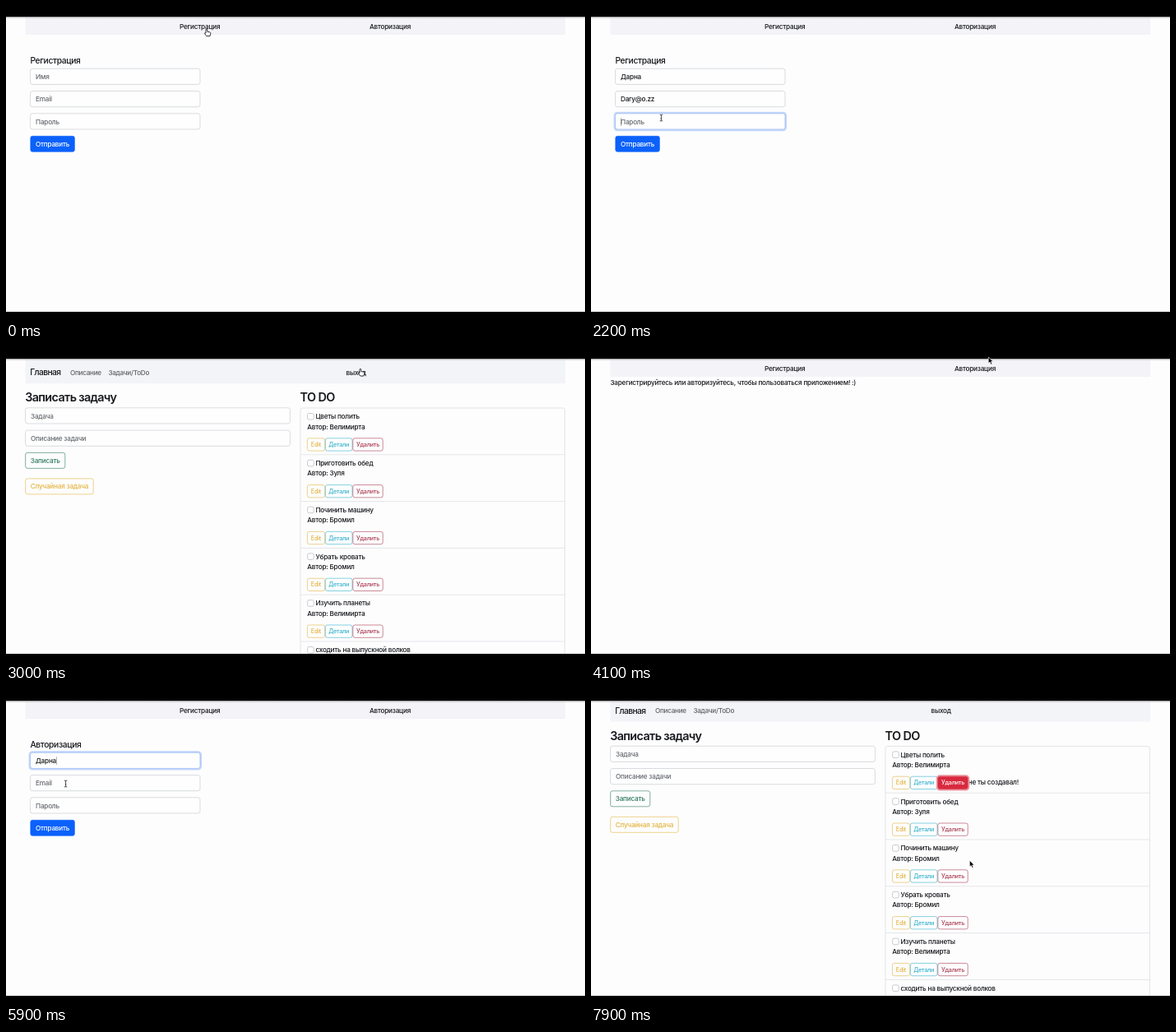
Recreate the animation shown at these times as an HTML page. Size 704x382 px, loop 8000 ms.

```html
<!DOCTYPE html>
<html lang="ru">
<head>
<meta charset="utf-8">
<title>Задачи</title>
<style>
  html, body { margin: 0; width: 100%; height: 100%; overflow: hidden; background: #fdfdfe; }
  svg { display: block; width: 704px; height: 382px; }
  text { font: 450 8.2px Inter, Roboto, sans-serif; letter-spacing: -.027em; fill: #16181b; white-space: pre; }
  .mid { text-anchor: middle; }
  .soft { fill: #65696f; }
  .link { fill: #5f6266; letter-spacing: -.035em; }
  .h5 { font-size: 10.3px; font-weight: 550; letter-spacing: -.035em; }
  .h3 { font-size: 14.4px; font-weight: 580; letter-spacing: -.045em; }
  .brand { font-size: 10.3px; font-weight: 500; letter-spacing: -.06em; }
  .small { font-size: 7.2px; }
  .caret { font-weight: 200; }
</style>
</head>
<body>
<svg viewBox="0 0 704 382">
  <defs>
    <linearGradient id="shade" x2="0" y2="1">
      <stop stop-color="#999"/>
      <stop offset="1" stop-color="#ccc" stop-opacity="0"/>
    </linearGradient>
  </defs>
  <rect width="704" height="382" fill="#fdfdfe"/>
  <g id="page"></g>
  <rect y="13" width="704" height="2.6" fill="url(#shade)"/>
  <rect width="704" height="13"/>
  <rect y="372" width="704" height="10"/>
  <g id="cursor"></g>
</svg>
<script>
const LOOP = 8000, STEP = 100;
const USER = 'Дарна', MAIL = 'Dary@o.zz', PASS = '•••••';
const RED = '#a83a50', YELLOW = '#e3b440', CYAN = '#35b2cc', GREEN = '#2f7a5e';

const page = document.getElementById('page');
const cursor = document.getElementById('cursor');

const text = (x, y, str, cls = '', attrs = '') => `<text x="${x}" y="${y}" class="${cls}" ${attrs}>${str}</text>`;

const box = (x, y, w, h, fill, stroke = 'none', r = 2.6, width = .7) =>
  `<rect x="${x}" y="${y}" width="${w}" height="${h}" rx="${r}" fill="${fill}" stroke="${stroke}" stroke-width="${width}"/>`;

function button(x, y, w, h, label, color, solid, cls = '') {
  return box(x, y, w, h, solid ? color : '#fdfdfe', color, 2.4, .6) +
    text(x + w / 2, y + h / 2 + (cls ? 2.6 : 3), label, 'mid ' + cls, `style="fill:${solid ? '#fff' : color}"`);
}

function field(x, y, w, hint, value = '', focused = false) {
  const ring = focused ? box(x - 1, y - 1, w + 2, 21.4, 'none', '#c3d6fb', 3.4, 2) : '';
  const caret = focused ? '<tspan class="caret" dx="-.8">|</tspan>' : '';
  const base = y + 12.8;
  const content = value
    ? text(x + 6.4, base, value + caret)
    : text(x + 6.4, base, hint, 'soft') + (focused ? text(x + 5.6, base, '|', 'caret') : '');
  return ring + box(x, y, w, 19.2, '#fefefe', focused ? '#8db0f3' : '#c9cdd2') + content;
}

const guestNav = () => box(23.5, 13, 656.5, 22, '#f3f3f8', 'none', 0) +
  text(235.7, 28.4, 'Регистрация', 'mid') + text(467, 28.4, 'Авторизация', 'mid');

const gate = () => guestNav() +
  text(23.4, 44.6, 'Зарегистрируйтесь или авторизуйтесь, чтобы пользоваться приложением! :)');

function form(title, values, focus) {
  const fields = ['Имя', 'Email', 'Пароль'].map((hint, i) =>
    field(29.6, 76.2 + 27.3 * i, 206.4, hint, values[i], focus === i)).join('');
  return guestNav() + text(29.4, 69.6, title, 'h5') + fields +
    button(29.8, 158.3, 53.6, 19, 'Отправить', '#0b61fb', true);
}

const TASKS = [
  ['Цветы полить', 'Велимирта'],
  ['Приготовить обед', 'Зуля'],
  ['Починить машину', 'Бромил'],
  ['Убрать кровать', 'Бромил'],
  ['Изучить планеты', 'Велимирта'],
  ['сходить на выпускной волков', 'Бромил']
];

function task([name, author], i, active, ring, message) {
  const y = 68.4 + 56.8 * i;
  return (i ? `<path d="M358 ${y}H679.5" stroke="#dcdde0" stroke-width=".7"/>` : '') +
    box(366.6, y + 6.5, 7.6, 7.6, '#fefefe', '#b4b7bb', 1.8) +
    text(376.4, y + 13.3, name) +
    text(366.2, y + 25.6, 'Автор: ' + author) +
    (message ? text(458.8, y + 47, 'не ты создавал!') : '') +
    button(366.4, y + 36.8, 21.2, 15.3, 'Edit', YELLOW, false, 'small') +
    button(388.4, y + 36.8, 32.6, 15.3, 'Детали', CYAN, false, 'small') +
    (ring ? box(420.8, y + 35.8, 38.4, 17.3, 'none', '#eb9aa4', 3.2, 2) : '') +
    button(421.8, y + 36.8, 36.4, 15.3, 'Удалить', active ? '#d9293e' : RED, active, 'small');
}

function board(shift, t) {
  const rows = TASKS.map((item, i) =>
    task(item, i, !i && t >= 6800, !i && t >= 6900, !i && t >= 7000)).join('');
  return box(23.5, 13, 656.5, 25.5 + shift, '#f3f4f8', 'none', 0) +
    `<g transform="translate(0 ${shift})">` +
    text(29.2, 28.7, 'Главная', 'brand') +
    text(78, 28, 'Описание', 'link') + text(124.4, 28, 'Задачи/ToDo', 'link') +
    text(425.6, 28, 'выход', 'mid') +
    text(23.2, 60.8, 'Записать задачу', 'h3') + text(357.6, 60.8, 'TO DO', 'h3') +
    field(23.6, 68.2, 321.8, 'Задача') + field(23.6, 95.5, 321.8, 'Описание задачи') +
    button(23.7, 122.8, 48.1, 19, 'Записать', GREEN) +
    button(23.7, 154.3, 82.5, 19, 'Случайная задача', YELLOW) +
    box(358, 68.4, 321.5, 340, '#fdfdfe', '#d6d8db') + rows + '</g>';
}

// Part of a string typed between two moments
const typed = (str, t, from, to) =>
  str.slice(0, Math.max(0, Math.ceil(str.length * Math.min(1, (t - from) / (to - from)))));

function register(t) {
  const focus = t < 500 ? -1 : t < 900 ? 0 : t < 2000 ? 1 : t < 2700 ? 2 : -1;
  return form('Регистрация',
    [typed(USER, t, 500, 800), typed(MAIL, t, 900, 1500), typed(PASS, t, 2200, 2500)], focus);
}

function login(t) {
  const focus = t < 5400 ? -1 : t < 6000 ? 0 : t < 6100 ? 1 : 2;
  return form('Авторизация',
    [typed(USER, t, 5400, 5800), typed(MAIL, t, 5900, 6000), typed(PASS, t, 6000, 6100)], focus);
}

function scene(t) {
  if (t < 2700) return register(t);
  if (t < 3300) return board(4.6, t);
  if (t < 4700) return gate();
  if (t < 6300) return login(t);
  return board(t < 6400 ? 4.6 : 0, t);
}

const SHAPES = {
  none: '',
  arrow: '<path d="M0 0V7.6L1.8 6 3.1 8.9 4.5 8.3 3.2 5.5H5.6Z" fill="#000" stroke="#fff" stroke-width=".6"/>',
  hand: '<path d="M-1 .8a.9.9 0 0 1 1.8 0V3.2l3 .6q1.3.4 1 1.7L4 8.6H-.3L-2.6 5.3q.1-1.1 1.6-.2Z" fill="#fff" stroke="#222" stroke-width=".9" stroke-linejoin="round"/>',
  beam: '<path d="M-1.7-4Q0-4 0-3Q0-4 1.7-4M0-3V3M-1.7 4Q0 4 0 3Q0 4 1.7 4M-.8.9H.8" fill="none" stroke="#222" stroke-width=".8"/>'
};

// Pointer stops: time, x, y, shape until the next stop
const STOPS = [
  [0, 244, 28, 'hand'], [100, 220, 40, 'arrow'], [400, 90, 86, 'beam'],
  [600, 90, 86, 'none'], [900, 82, 113, 'beam'], [1000, 82, 113, 'none'],
  [1700, 82, 113, 'beam'], [2000, 85.4, 136, 'beam'], [2300, 85.4, 136, 'none'],
  [2500, 70, 158, 'arrow'], [2600, 60, 165, 'hand'], [2700, 62, 165, 'arrow'],
  [3000, 431, 25.4, 'hand'], [3300, 431, 25.4, 'arrow'], [3400, 431, 25.4, 'arrow'],
  [3800, 470, 36, 'arrow'], [4100, 483.2, 11, 'arrow'], [4300, 467, 27, 'arrow'],
  [4400, 467, 27, 'hand'], [4900, 467, 27, 'arrow'], [5400, 80, 87, 'beam'],
  [5500, 80, 87, 'none'], [5900, 72.6, 114, 'beam'], [6000, 80, 138, 'beam'],
  [6200, 60, 165, 'hand'], [6300, 240, 120, 'arrow'], [6400, 420.4, 73, 'arrow'],
  [6700, 438, 98, 'arrow'], [6800, 438, 111, 'hand'], [7100, 438, 111, 'hand'],
  [7200, 447, 124, 'arrow'], [7600, 457, 328, 'arrow'], [7900, 460.4, 207.4, 'arrow']
];

function pointer(t) {
  const i = STOPS.findLastIndex(stop => stop[0] <= t);
  const a = STOPS[i], b = STOPS[i + 1] || a;
  const k = a === b ? 0 : (t - a[0]) / (b[0] - a[0]);
  const at = n => a[n] + (b[n] - a[n]) * k;
  return `<g transform="translate(${at(1)} ${at(2)})">${SHAPES[a[3]]}</g>`;
}

let last = -1;
const start = performance.now();
function tick() {
  const now = Math.max(0, performance.now() - start) % LOOP;
  const t = Math.floor(now / STEP) * STEP;
  if (t !== last) {
    page.innerHTML = scene(t);
    cursor.innerHTML = pointer(t);
    last = t;
  }
  requestAnimationFrame(tick);
}
tick();
</script>
</body>
</html>
```
